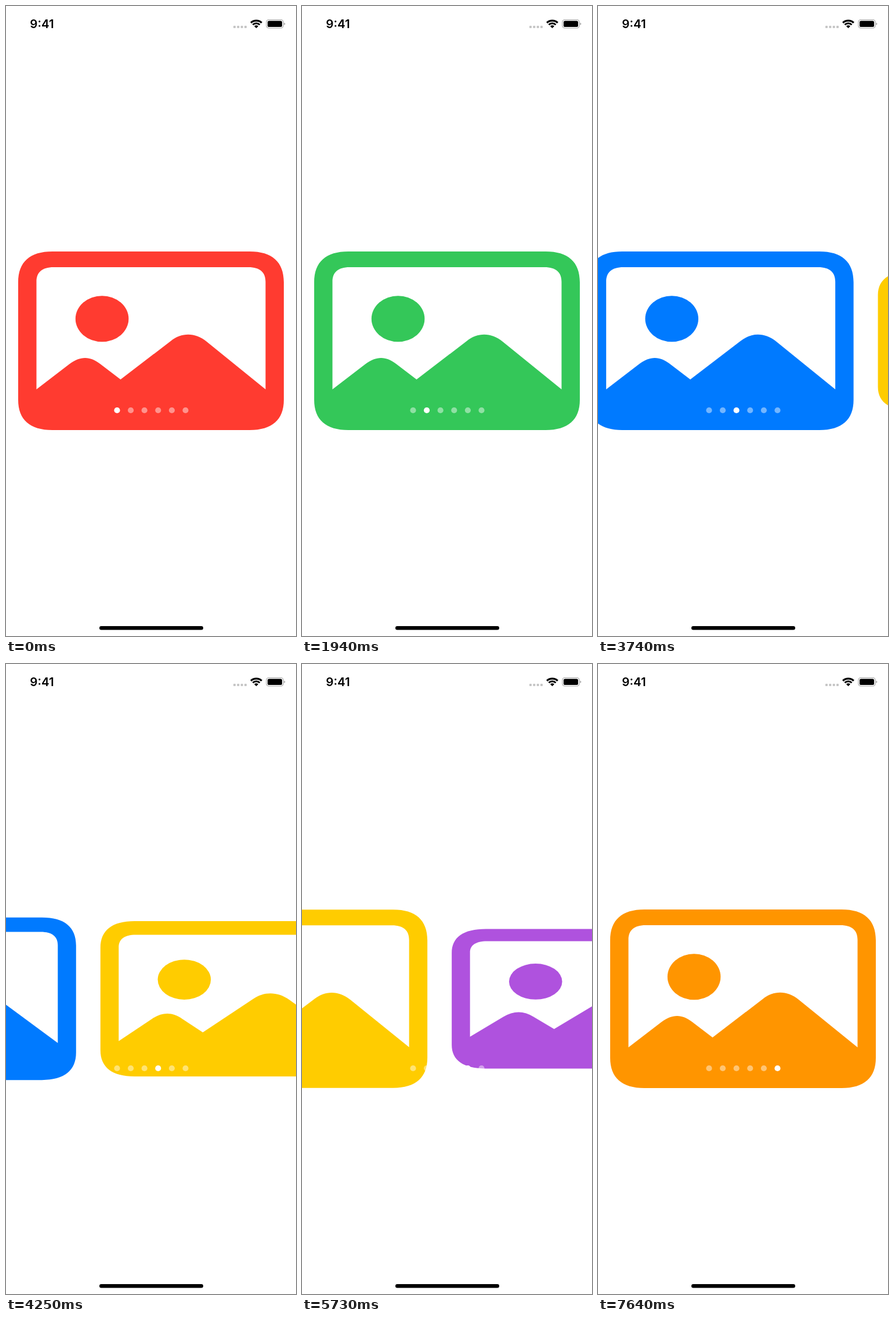
Write an HTML page that moves like this. It is 500x1083 px and loops after 7.66 s.

```html
<!DOCTYPE html>
<html lang="en">
<head>
<meta charset="utf-8">
<title>Paged gallery</title>
<style>
  html, body { margin: 0; width: 100%; height: 100%; overflow: hidden; background: #fff; }
  svg { display: block; width: 100vw; height: 100vh; }
  .clock { font: 600 20.5px Inter, "Liberation Sans", sans-serif; }
</style>
</head>
<body>
<svg viewBox="0 0 500 1083">
  <defs>
    <g id="picture">
      <path fill-rule="evenodd" d="
        M80 422H420C459 422 479 440 479 475V677C479 711 459 729 420 729H80C41 729 21 711 21 677V475C21 440 41 422 80 422Z
        M52.5 659V474C52.5 458 62 449 82 449H418C438 449 447.5 458 447.5 474V659
        L346 577C326 561 303 561 284 576L197.5 642L162 615C145 601.5 128 601.5 110 615Z"/>
      <ellipse cx="165.6" cy="537.7" rx="45.8" ry="39.5"/>
    </g>
  </defs>

  <g id="pages"></g>
  <g id="dots" fill="#fff"></g>

  <text class="clock" x="41.3" y="38">9:41</text>
  <g fill="#c6c6c6">
    <rect x="392" y="34" width="4" height="4" rx="1"/>
    <rect x="398.3" y="34" width="4" height="4" rx="1"/>
    <rect x="404.7" y="34" width="4" height="4" rx="1"/>
    <rect x="411" y="34" width="4" height="4" rx="1"/>
  </g>
  <g fill="none" stroke="#000">
    <path stroke-width="3.3" d="M422.2 28.9A13.4 13.4 0 0 1 440.8 28.9"/>
    <path stroke-width="3" d="M425.5 32.3A8.6 8.6 0 0 1 437.5 32.3"/>
  </g>
  <path d="M431.5 38.3L428 34.8A5 5 0 0 1 435 34.8Z"/>
  <rect x="449" y="23.5" width="29" height="14.5" rx="4.3" fill="none" stroke="#a6a6a6" stroke-width="1.2"/>
  <rect x="451" y="25.5" width="25" height="10.5" rx="2.6"/>
  <path d="M479.4 28.5Q481.4 29.3 481.4 30.8T479.4 33.1Z" fill="#a6a6a6"/>
  <rect x="161" y="1066" width="179" height="6.5" rx="3.25"/>
</svg>

<script>
  const LOOP = 7660, WIDTH = 500, MIDDLE = 575.5;
  const SMALL = 0.78, GROW_MS = 350;
  const COLORS = ['#ff3b30', '#34c759', '#007aff', '#ffcc00', '#af52de', '#ff9500'];

  // Each swipe: start and duration in ms.
  const SWIPES = [[764, 934], [2040, 1160], [3564, 1036], [5156, 1110], [6665, 791]];

  // Runs of evenly spaced screen updates: first, last, count.
  const UPDATES = [
    [860, 1110, 3], [1250, 1600, 4], [1750, 1940, 3], [2110, 2720, 6], [2870, 3280, 5],
    [3740, 3970, 3], [4120, 4700, 6], [5230, 5350, 2], [5490, 5730, 3], [5870, 6280, 5],
    [6750, 6860, 2], [7000, 7360, 4], [7500, 7640, 3]
  ];
  const ticks = [0, ...UPDATES.flatMap(([first, last, count]) =>
    Array.from({ length: count }, (_, i) => first + (last - first) * i / (count - 1)))];

  const ease = p => {
    p = Math.min(1, Math.max(0, p));
    return p * p * (3 - 2 * p);
  };

  function add(parent, tag, attributes) {
    const node = document.createElementNS('http://www.w3.org/2000/svg', tag);
    for (const name in attributes) node.setAttribute(name, attributes[name]);
    return parent.appendChild(node);
  }

  const pageGroup = document.getElementById('pages');
  const dotGroup = document.getElementById('dots');
  const pages = COLORS.map(fill => add(pageGroup, 'use', { href: '#picture', fill }));
  const dots = COLORS.map((_, i) => add(dotGroup, 'circle', { cx: 191.5 + i * 23.6, cy: 695, r: 5.1 }));

  function render(time) {
    const t = ticks.findLast(tick => tick <= time + 0.01);
    const scroll = SWIPES.reduce((sum, [start, ms]) => sum + ease((t - start) / ms), 0);
    const halves = SWIPES.map(([start, ms]) => start + ms / 2);
    const selected = halves.filter(half => t >= half).length;
    // Page i grows as it becomes selected and shrinks when the next one does.
    const grown = [1, ...halves.map(half => ease((t - half) / GROW_MS)), 0];

    pages.forEach((page, i) => {
      const x = (i - scroll) * WIDTH;
      const scale = SMALL + (1 - SMALL) * (grown[i] - grown[i + 1]);
      page.setAttribute('transform', `translate(${x} ${MIDDLE * (1 - scale)}) scale(1 ${scale})`);
    });
    dots.forEach((dot, i) => dot.setAttribute('opacity', i === selected ? 1 : 0.45));
  }

  const begin = performance.now();
  function frame() {
    render((performance.now() - begin) % LOOP);
    requestAnimationFrame(frame);
  }
  frame();
</script>
</body>
</html>
```
